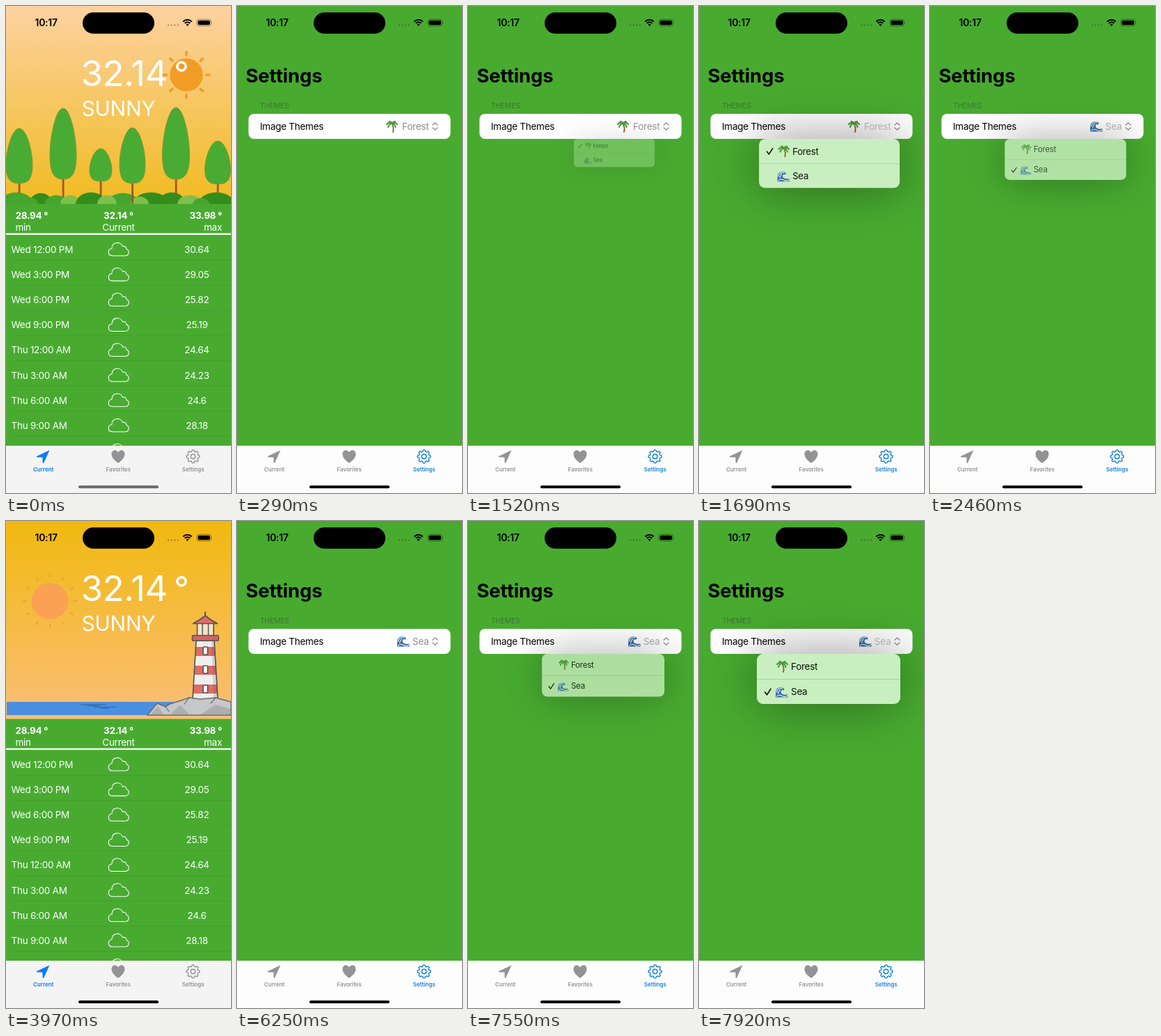
Write an HTML page that moves like this. It is 323 px wide and 700 px high and loops after 8000 ms.

```html
<!DOCTYPE html>
<html lang="en">
<head>
<meta charset="utf-8">
<title>Weather themes</title>
<style>
  html, body { margin: 0; width: 100%; height: 100%; overflow: hidden; background: #48ab30; }
  svg { display: block; width: 323px; height: 700px; }
  text { font-family: Inter, "Open Sans", sans-serif; letter-spacing: -.02em; white-space: pre; }
  .big { letter-spacing: -.008em; }
  .line { fill: none; stroke-linecap: round; stroke-linejoin: round; }
</style>
</head>
<body>
<svg id="stage" viewBox="0 0 323 700"></svg>
<script>
const GREEN = '#48ab30', GREY = '#939397';
const LOOP = 8000;

const range = n => [...Array(n).keys()];
const rect = (x, y, w, h, fill, r = 0, more = '') =>
  `<rect x="${x}" y="${y}" width="${w}" height="${h}" rx="${r}" fill="${fill}" ${more}/>`;
const circle = (x, y, r, fill, more = '') => `<circle cx="${x}" cy="${y}" r="${r}" fill="${fill}" ${more}/>`;
const line = (d, color, width = 1, more = '') =>
  `<path class="line" d="${d}" stroke="${color}" stroke-width="${width}" ${more}/>`;
const shape = (d, fill, more = '') => `<path d="${d}" fill="${fill}" ${more}/>`;
const at = (x, y, body) => `<g transform="translate(${x} ${y})">${body}</g>`;
const text = (x, y, s, fill = '#fff', size = 13.5, weight = 400, anchor = 'start', more = '') =>
  `<text x="${x}" y="${y}" fill="${fill}" font-size="${size}" font-weight="${weight}" text-anchor="${anchor}" ${more}>${s}</text>`;
const group = (id, body) => `<g id="${id}">${body}</g>`;
const gradient = (id, top, bottom) =>
  `<linearGradient id="${id}" x2="0" y2="1"><stop stop-color="${top}"/><stop offset="1" stop-color="${bottom}"/></linearGradient>`;
const rays = (n, r1, r2) => range(n).map(i => {
  const a = i * 2 * Math.PI / n, c = Math.cos(a), s = Math.sin(a);
  return `M${c * r1} ${s * r1}L${c * r2} ${s * r2}`;
}).join('');

// Theme scenery
function tree(x, top, bottom, w) {
  const h = bottom - top;
  const side = k => `C${x + k * w * .55} ${top} ${x + k * w} ${top + h * .4} ${x + k * w} ${top + h * .66}
    C${x + k * w} ${bottom - h * .06} ${x + k * w * .6} ${bottom} ${x} ${bottom}`;
  return rect(x - 1.3, bottom - 6, 2.8, 290 - bottom, '#a4561f') +
    shape(`M${x} ${top}${side(1)}M${x} ${top}${side(-1)}`, '#49ab34', 'stroke="#7a982c" stroke-width=".9"');
}

const bush = (x, rx, ry, fill) => `<ellipse cx="${x}" cy="285" rx="${rx}" ry="${ry}" fill="${fill}"/>`;

function forest() {
  const back = [[19, 176, 255, 19], [82, 147, 249, 19], [136, 205, 252, 16], [244, 146, 249, 19.5], [304, 194, 256, 18.5]];
  const dark = '#348c1b', mid = '#45a52e', light = '#7fc04c';
  const bushes = [[15, 24, 17, mid], [50, 17, 16, dark], [34, 12, 10, mid], [72, 16, 13, mid], [92, 14, 13, light],
    [122, 22, 17, dark], [168, 24, 16, mid], [145, 14, 13, light], [208, 26, 17, dark],
    [238, 20, 17, dark], [192, 13, 11, light], [264, 18, 13, light], [302, 26, 17, dark], [280, 12, 9, mid]];
  return rect(0, 0, 323, 285, 'url(#dawn)') +
    at(259, 99, circle(0, 0, 23.7, '#f19d25') + line(rays(8, 28.5, 33), '#f19d25', 3.6)) +
    back.map(t => tree(...t)).join('') + bushes.map(b => bush(...b)).join('') + tree(181.5, 175, 255, 18.5);
}

function lighthouse() {
  const ink = 'stroke="#55575a" stroke-width="1.7" stroke-linejoin="round"';
  const half = y => 13 + (y - 172) * .06;
  const band = y => shape(`M${286 - half(y)} ${y}H${286 + half(y)}L${286 + half(y + 13)} ${y + 13}H${286 - half(y + 13)}Z`, '#df6c65');
  const tower = 'M273 172H299L304 256H268Z';
  return shape(tower, '#f1efee') + [181, 208, 235].map(band).join('') +
    shape('M295 172H299L304 256H298Z', 'rgba(70,70,80,.18)') + shape(tower, 'none', ink) +
    [181, 208, 236].map(y => rect(283, y, 6.5, 11, '#fafafa', 1, ink)).join('') +
    rect(274.5, 147, 23.5, 18, '#f3e6c6', 0, ink) + line('M282 148V164M290.500 148V164', '#55575a', 1.5) +
    shape('M268.500 147.500Q279 142 286 136Q293 142 303.500 147.500Z', '#df6c65', ink) +
    line('M286 131V136', '#55575a', 2) + rect(267.5, 164.5, 37.5, 7.5, '#d4645d', 1, ink);
}

function sea() {
  return rect(0, 0, 323, 285, 'url(#dusk)') +
    at(63, 115, circle(0, 0, 26.3, '#fba153') + line(rays(12, 34, 38.5), '#eb9d35', 1.5)) +
    rect(1, 260, 322, 19, '#4a90e0') +
    line('M108 264H143M118 265.500H134M126 267.500H158M136 269H147', '#3472b5', 1.3) +
    lighthouse() +
    shape('M203 279L217 262L229 267L235 263L248 259L263 254L279 256L301 254L323 260V279Z', '#c6c7c8',
      'stroke="#696b6e" stroke-width="1.6" stroke-linejoin="round"') +
    shape('M208 278L218 266L226 278ZM236 278L250 264L263 278ZM280 278L300 264L322 270V278Z', '#acaeb0') +
    line('M229 267L234 274M263 254L256 263M301 254L294 262', '#696b6e', 1.2);
}

// Weather page
const cloud = line('M-9 9C-16.500 9-16.500-.5-10-1.500C-10-11.500 3-12 5.500-4.300C9-5.500 11-3 11-.3C16 1 15 9 9 9Z', '#fff', 1.05);

function forecast() {
  const hours = ['Wed 12:00 PM', 'Wed 3:00 PM', 'Wed 6:00 PM', 'Wed 9:00 PM',
    'Thu 12:00 AM', 'Thu 3:00 AM', 'Thu 6:00 AM', 'Thu 9:00 AM', 'Thu 12:00 PM'];
  const degrees = [30.64, 29.05, 25.82, 25.19, 24.64, 24.23, 24.6, 28.18, 30.12];
  return hours.map((hour, i) => at(0, 350 + i * 36.14,
    text(7.5, 4.8, hour) + at(162, 0, cloud) + text(274, 4.8, degrees[i], '#fff', 13.5, 400, 'middle') +
    rect(14, 15, 309, .8, 'rgba(0,0,0,.1)'))).join('');
}

function weather() {
  const summary = [[13.5, '28.94 °', 'min', 'start'], [161.5, '32.14 °', 'Current', 'middle'], [310, '33.98 °', 'max', 'end']];
  return group('forest', forest()) + group('sea', sea()) +
    text(107.5, 115, '32.14', '#fff', 51, 400, 'start', 'class="big"') +
    text(241, 113.5, '°', '#fff', 48) +
    text(108.5, 157.5, 'SUNNY', '#fff', 30, 400, 'start', 'class="big"') +
    rect(0, 284.5, 323, 350, GREEN) + rect(0, 326.6, 323, 2.4, '#f4f8f2') +
    summary.map(([x, value, name, anchor]) =>
      text(x, 306.3, value, '#fff', 13.5, 700, anchor) + text(x, 323, name, '#fff', 13.5, 400, anchor)).join('') +
    forecast();
}

// Settings page
const palm = line('M1.500 8Q3 3 .5-3', '#8d6337', 1.9) +
  line('M0-4Q-4-7-7.500-3M0-4Q-4-4-5.500 1M0-4Q4-7 7.500-3M0-4Q4-4 5 1M0-4Q-1-7-4-7M0-4Q2-7 4.500-7', '#4a9a38', 2.2);
const wave = shape('M-8.500 7.500V0C-8-5-4-7.500 1-6.500C4-6 4.500-3 3-2.500C0-4-2-1 0 2C3 4.500 6 3.500 9 3.500V7.500Z', '#3d6ea6') +
  line('M-7.500 0C-6-4-3-6 1-5.500M-5 2Q-4.500-1.500-2-3M-7 6Q-3 3 1 5.500T8.500 5', '#dde9f2', 1.3);

const choice = (id, name, icon, iconX) => group(id,
  at(iconX, 173, icon) + text(275.3, 178, name, '#8a8a8e', 13.5, 400, 'end', 'class="value"'));

function settings() {
  const menu = rect(83, 191, 206, 72, 'rgba(0,0,0,.42)', 10, 'style="filter:blur(37px)"') +
    rect(83, 191, 206, 72, '#c9efc0', 9) +
    group('items', rect(83, 227, 206, .8, 'rgba(40,110,30,.25)') +
      at(119.5, 209, palm) + text(132, 214, 'Forest', '#0b130a') +
      at(118.5, 246, wave) + text(132, 250, 'Sea', '#0b130a') +
      line('M94.500 209.500l3 4l5.500-8.500', '#0b130a', 1.6, 'id="check"'));
  return rect(0, 0, 323, 640, GREEN) +
    text(12.5, 110, 'Settings', '#000', 27.5, 700, 'start', 'class="big"') +
    text(33, 147, 'THEMES', '#3f7433', 10.4) +
    rect(16.5, 155, 290, 36, '#fff', 8) +
    text(33, 178, 'Image Themes', '#000') +
    choice('pickForest', 'Forest', palm, 222.5) + choice('pickSea', 'Sea', wave, 238.5) +
    line('M281 171l3.500-3l3.500 3M281 175l3.500 3l3.500-3', '#8a8a8e', 1.3, 'class="value"') +
    group('menu', menu);
}

// Frame around both pages
function statusBar() {
  const arc = r => `M${-r * .72} ${-r * .7}A${r} ${r} 0 0 1 ${r * .72} ${-r * .7}`;
  return text(41.5, 29, '10:17', '#000', 14, 600) + rect(110, 9.3, 103, 30.4, '#000', 15.2) +
    range(4).map(i => circle(233 + i * 4.6, 27.5, 1.1, 'rgba(70,40,40,.5)')).join('') +
    at(260.5, 28.5, line(arc(8.6) + arc(5.3), '#000', 2, 'style="stroke-linecap:butt"') +
      shape('M0 .5L-2.200-2Q0-3.700 2.200-2Z', '#000')) +
    rect(274, 19.2, 20.4, 9.6, 'none', 3, 'stroke="rgba(0,0,0,.4)"') + rect(275.5, 20.7, 17.4, 6.6, '#000', 1.8) +
    shape('M295.600 22.500Q297.200 24 295.600 25.700Z', 'rgba(0,0,0,.45)');
}

function tabBar() {
  const gear = 'M' + range(96).map(i => {
    const a = i * Math.PI / 48, r = 8.4 + Math.max(-1, Math.min(1, 2.2 * Math.cos(8 * a)));
    return `${r * Math.cos(a)} ${r * Math.sin(a)}`;
  }).join('L') + 'Z';
  const tab = (id, x, name, icon) =>
    `<g id="${id}" color="${GREY}">${icon}${text(x, 668.5, name, 'currentColor', 8, 600, 'middle', 'style="letter-spacing:0"')}</g>`;
  return rect(0, 632, 323, 68, '#fdfdfd', 0, 'id="bar"') +
    tab('tabCurrent', 53.7, 'Current',
      shape('M62.500 638.500L44 647.200Q43.300 648.600 45 648.600L52.500 648.700L52.600 656Q53 657.700 54.300 656.400Z', 'currentColor')) +
    tab('tabFavorites', 161.2, 'Favorites',
      shape('M161 657C154 652 151.500 648 151.500 644C151.500 638 158 636.500 161 641.500C164 636.500 170.500 638 170.500 644C170.500 648 168 652 161 657Z', 'currentColor')) +
    tab('tabSettings', 268.7, 'Settings',
      at(268.5, 647.5, line(gear, 'currentColor', 1.4) + line('M-3.300 0a3.300 3.300 0 1 0 6.600 0a3.300 3.300 0 1 0-6.600 0', 'currentColor', 1.4))) +
    rect(104, 689.3, 115, 4, '#000', 2, 'id="homeBar"');
}

document.getElementById('stage').innerHTML =
  `<defs>${gradient('dawn', '#fdd2a1', '#f0bb20')}${gradient('dusk', '#f1b90f', '#fabe78')}</defs>` +
  group('weather', weather()) + group('settings', settings()) + statusBar() + tabBar();

const el = id => document.getElementById(id);
const show = (id, on) => el(id).setAttribute('display', on ? 'inline' : 'none');
const clamp = v => Math.max(0, Math.min(1, v));

function opening(age) {
  const scale = 1 - .7 * Math.exp(-(age + 25) / 55);
  return { sx: scale, sy: scale, alpha: clamp((age + 40) / 130), items: 1, dim: clamp((age + 30) / 150) };
}

function closing(age) {
  const k = clamp((age + 40) / 180);
  return { sx: 1 - .675 * k, sy: 1 - .79 * k, alpha: 1 - .82 * k, items: 1 - k, dim: 1 - k };
}

function menuAt(t) {
  if (t >= 7490) return opening(t - 7490);
  if (t >= 2460 && t < 3970) return closing(t - 2460);
  if (t >= 1520 && t < 2460) return opening(t - 1520);
  return null;
}

function render(t) {
  const onWeather = t < 290 || (t >= 3970 && t < 6250);
  const isSea = t >= 2460;
  const menu = menuAt(t);
  show('weather', onWeather);
  show('settings', !onWeather);
  show('forest', !isSea);
  show('sea', isSea);
  show('pickForest', !isSea);
  show('pickSea', isSea);
  show('menu', menu);
  if (menu) {
    el('menu').setAttribute('transform', `translate(241 191) scale(${menu.sx} ${menu.sy}) translate(-241 -191)`);
    el('menu').setAttribute('opacity', menu.alpha);
    el('items').setAttribute('opacity', menu.items);
    el('check').setAttribute('transform', `translate(0 ${isSea ? 36.3 : 0})`);
  }
  document.querySelectorAll('.value').forEach(v => v.setAttribute('opacity', 1 - .5 * (menu ? menu.dim : 0)));
  el('bar').setAttribute('fill', onWeather ? '#f4f4f4' : '#fdfdfd');
  el('homeBar').setAttribute('fill', onWeather && !isSea ? '#6a6a6a' : '#000');
  el('tabCurrent').setAttribute('color', onWeather ? '#0a7aff' : GREY);
  el('tabSettings').setAttribute('color', onWeather ? GREY : '#0f7fdf');
}

const start = performance.now();
function tick() {
  render((performance.now() - start) % LOOP);
  requestAnimationFrame(tick);
}
tick();
</script>
</body>
</html>
```
